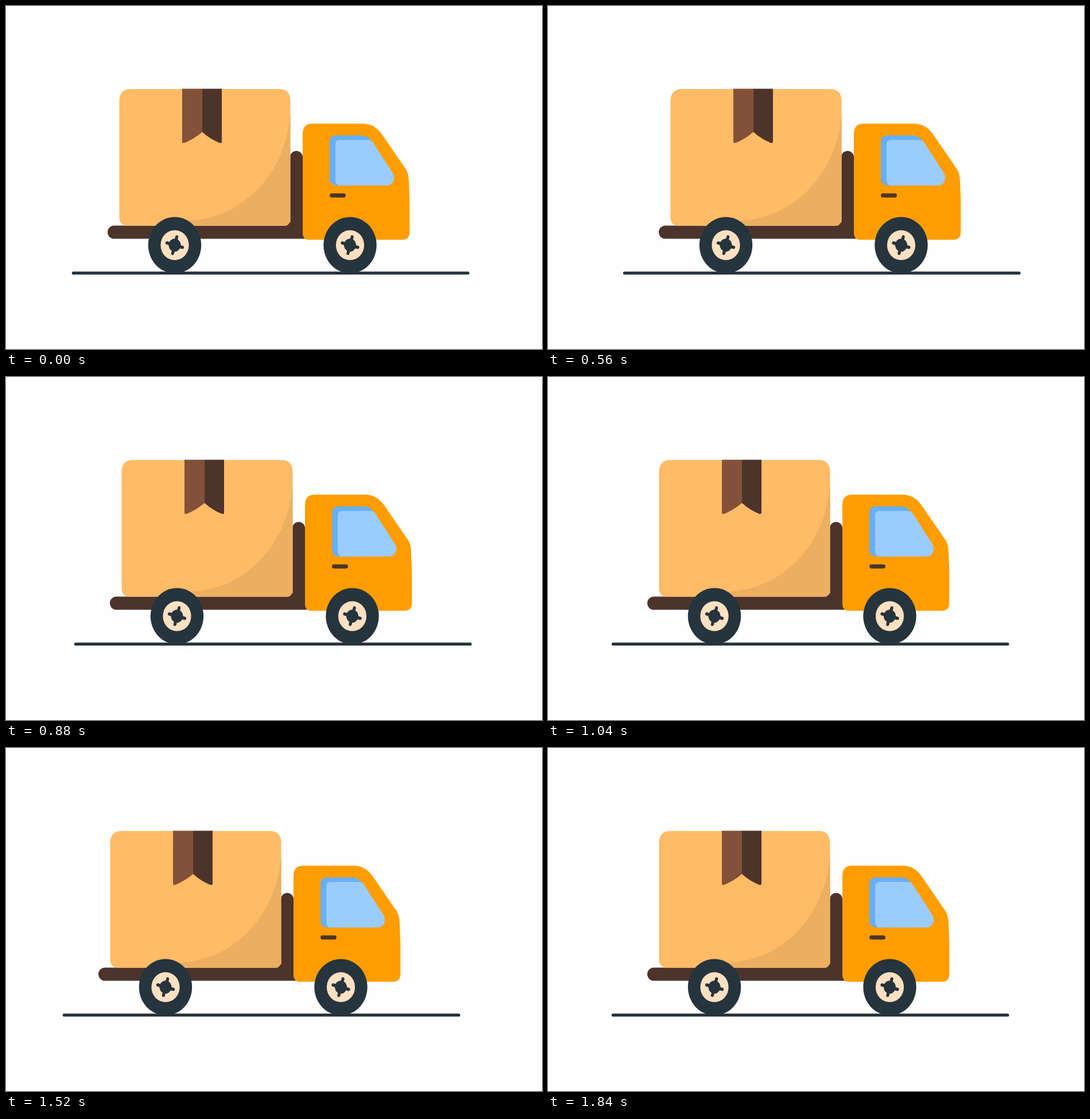
An HTML page without scripts for the animation above (1920 ms loop, 934 px wide and 599 px high).

```html
<!DOCTYPE html>
<html lang="en">
<head>
<meta charset="utf-8">
<title>Delivery truck</title>
<style>
  html, body { margin: 0; width: 100%; height: 100%; overflow: hidden; background: #fefefe; }
  svg { display: block; width: 934px; height: 599px; }
  .dark { fill: #26343d; }
  .brown { fill: #4d342b; }
  .cream { fill: #ffe0c1; }
  .spokes { stroke: #26343d; stroke-width: 5.2; stroke-linecap: round; }
</style>
</head>
<body>
<svg viewBox="0 0 934 599">
  <defs>
    <g id="wheel" transform="scale(1 1.065)">
      <circle class="dark" r="46.2"/>
      <circle class="cream" r="24.6"/>
      <g transform="rotate(15)">
        <circle class="dark" r="10.6"/>
        <path class="spokes" d="M-14 0H14M0 -14V14"/>
      </g>
    </g>
  </defs>

  <g>
    <!-- sine sway, rounded to whole pixels, 80 ms per step -->
    <animateTransform attributeName="transform" type="translate" calcMode="discrete"
      dur="1.92s" repeatCount="indefinite"
      values="0;4;8;12;15;16;17;16;15;12;8;4;0;-4;-8;-12;-15;-16;-17;-16;-15;-12;-8;-4"/>

    <!-- bed and post -->
    <rect class="brown" x="177" y="383.5" width="352" height="23" rx="11.5"/>
    <path class="brown" d="M495 406V264A11 11 0 0 1 517 264V406ZM484 386V374H500V386Z"/>

    <!-- box -->
    <path fill="#ffbb66" d="M197.5 166Q197.5 145 217.5 145H475.5Q495.5 145 495.5 166V376Q495.5 378 493.5 379Q491 383.5 486 383.8H211Q197.5 383 197.5 369Z"/>
    <path fill="#ecae61" d="M495.5 188C488 290 415 372 316 375V383.8H486Q491 383.5 493.5 379Q495.5 378 495.5 376Z"/>
    <path fill="#835139" d="M307 144.5H342V220Q328 232 311 239Q307 240 307 237Z"/>
    <path fill="#4d342b" d="M342 144.5H376V237Q376 240 372 239Q355 232 342 220Z"/>

    <!-- cab -->
    <path fill="#ff9d00" d="M517 223Q517 205.5 534 205.5H622Q642 205.5 655 224L694 281Q702 290 702 308L703.3 340V395Q703 408 691 408.3H528Q517 408 517 396Z"/>
    <path fill="#67aff7" d="M564 238Q564 226 576 226H619Q630 226 638 237L600 313.5H577Q564 313 564 301Z"/>
    <path fill="#9bccff" d="M574 242Q574 234 582 234H632Q637 234 640 239L674 292Q678 299 674.500 307Q671 313.500 663 313.500H579Q574 310 574 304Z"/>
    <rect class="brown" x="564" y="327.200" width="28" height="7.200" rx="3.600"/>

    <!-- wheels and road -->
    <use href="#wheel" x="0" y="0" transform="translate(294 417.600)"/>
    <use href="#wheel" x="0" y="0" transform="translate(599.500 417.600)"/>
    <rect class="dark" x="114.800" y="463.700" width="692.700" height="5.400" rx="2.700"/>
  </g>
</svg>
</body>
</html>
```
